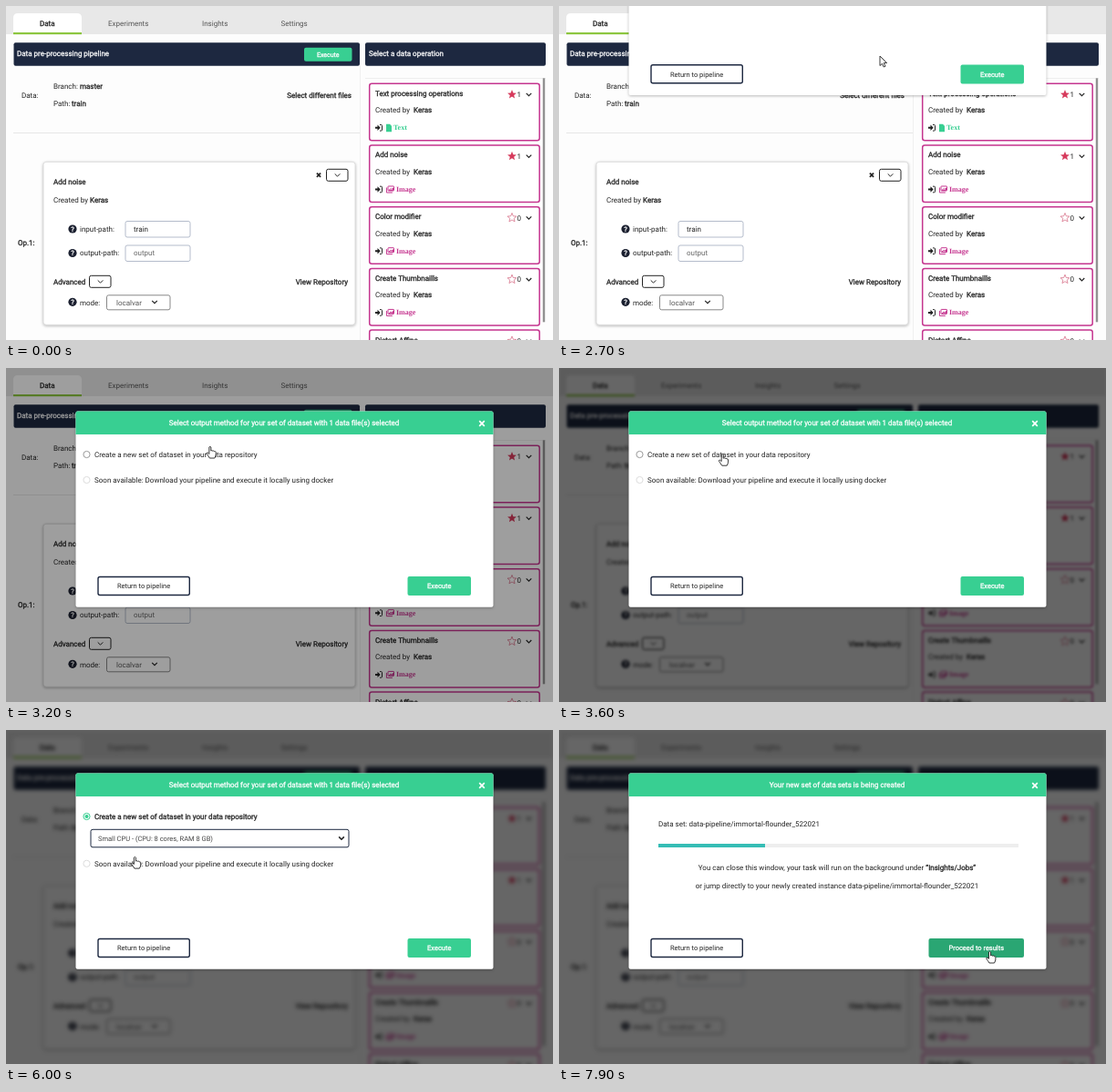
An HTML page that plays this animation: 600x367 px, repeating every 8 s.

```html
<!DOCTYPE html>
<html lang="en">
<head>
<meta charset="utf-8">
<title>Data pipeline</title>
<style>
html, body { margin: 0; width: 100%; height: 100%; overflow: hidden; background: #fdfdfd; }
svg { display: block; width: 100vw; height: 100vh; font: 8px Roboto, Arial, sans-serif; text-rendering: geometricPrecision; }
.serif { font-family: "Liberation Serif", Times, serif; font-weight: bold; }
.shadow { filter: drop-shadow(0 1px 1.5px #0004); }
</style>
</head>
<body>
<svg viewBox="0 0 600 367">
  <g id="page"></g>
  <rect id="shade" width="600" height="367"/>
  <g id="modal" class="shadow"></g>
  <g id="cursor" stroke-linejoin="round"></g>
</svg>
<script>
const LOOP = 8000;
const NAVY = '#1d2840', GREEN = '#38cf92', DARK_GREEN = '#2aa673', PINK = '#c5358f', INK = '#222';
const $ = id => document.getElementById(id);

// Drawing helpers, each returning SVG markup
const rect = (x, y, w, h, fill, stroke = 'none', r = 0, line = 1) =>
  `<rect x="${x}" y="${y}" width="${w}" height="${h}" rx="${r}" fill="${fill}" stroke="${stroke}" stroke-width="${line}"/>`;
const path = (d, fill, stroke = 'none', line = 1) =>
  `<path d="${d}" fill="${fill}" stroke="${stroke}" stroke-width="${line}"/>`;
const circle = (x, y, r, fill, stroke = 'none', line = 1) =>
  `<circle cx="${x}" cy="${y}" r="${r}" fill="${fill}" stroke="${stroke}" stroke-width="${line}"/>`;
const raise = markup => `<g transform="translate(0 -.7)">${markup}</g>`;
const text = (x, y, s, { fill = INK, size = 8, bold = false, anchor = 'start', cls = '' } = {}) =>
  `<text x="${x}" y="${y}" font-size="${size}" fill="${fill}" text-anchor="${anchor}" class="${cls}"` +
  `${bold ? ` stroke="${fill}" stroke-width=".3"` : ''}>${s}</text>`;
const bold = (x, y, s, opts) => text(x, y, s, { bold: true, ...opts });
const chevron = (x, y, color = INK, line = 1.2) =>
  path(`M${x - 2.8} ${y - 1.4}l2.8 2.8 2.8-2.8`, 'none', color, line);
const cross = (x, y, r, color) =>
  path(`M${x - r} ${y - r}l${2 * r} ${2 * r}m0 ${-2 * r}l${-2 * r} ${2 * r}`, 'none', color, 1.7);
const button = (x, y, w, h, label, hover, size = 7.5) =>
  rect(x, y, w, h, hover ? DARK_GREEN : GREEN, 'none', 2) +
  bold(x + w / 2, y + h / 2 + 2.8, label, { fill: '#fff', size, anchor: 'middle' });
const toggle = (x, y) => rect(x, y, 23.5, 13, '#fff', INK, 2) + chevron(x + 12, y + 6.5, INK, 1);
const help = (x, y) => circle(x, y, 4.6, '#1b2030') +
  bold(x, y + 2.7, '?', { fill: '#fff', size: 7.5, anchor: 'middle' });

function star(x, y, full) {
  let d = '';
  for (let i = 0; i < 10; i++) {
    const r = i % 2 ? 2.3 : 5.2, a = i * Math.PI / 5;
    d += `${i ? 'L' : 'M'}${x + r * Math.sin(a)} ${y - r * Math.cos(a)}`;
  }
  return path(d + 'Z', full ? '#d63a5c' : '#fff', full ? 'none' : '#d9748c', .8);
}

function operation(title, i) {
  const y = 86 + i * 67.7, isText = i === 0, full = i < 2, color = isText ? GREEN : PINK;
  const icon = isText
    ? path(`M417 ${y + 44.5}h4l2 2v6.5h-6z`, color)
    : rect(419, y + 45, 6.5, 5, 'none', color, .5) + path(`M417.4 ${y + 46.5}v5.5h6.5M420 ${y + 49.5}l2-2 1 1 1.5-1.5v2.5z`, 'none', color);
  const enter = path(`M405 ${y + 47.5}h2.5v-2.2l3.2 3.2-3.2 3.2v-2.2h-2.5z`, INK) +
    path(`M410 ${y + 45.2}h1.5q1 0 1 1v4.6q0 1-1 1h-1.5`, 'none', INK);
  return rect(398.7, y, 186.5, 62.5, '#fff', PINK, 2.5, 1.5) +
    bold(405, y + 13.5, title) + star(555, y + 12, full) +
    text(560.5, y + 15, full ? 1 : 0) + chevron(573.5, y + 12) +
    text(405, y + 32, 'Created by') + bold(447, y + 32, 'Keras') + enter + icon +
    text(isText ? 425 : 428, y + 51, isText ? 'Text' : 'Image', { fill: color, cls: 'serif' });
}

function field(y, label, value, color) {
  return help(73, y) + text(81, y + 3, label) +
    rect(131, y - 8.5, 71, 17.5, '#fff', '#b4bccb', 2) + text(140, y + 3, value, { fill: color });
}

function drawPage(hover) {
  const titles = ['Text processing operations', 'Add noise', 'Color modifier', 'Create Thumbnaills', 'Distort Affine'];
  const tabs = rect(0, 0, 600, 367, '#fdfdfd') + rect(0, 0, 600, 31, '#e8e8e8') +
    path('M8 31V13q0-5 5-5h65q5 0 5 5v18z', '#fff') + rect(8, 29, 75, 2.2, '#8cc63f') +
    bold(37, 22, 'Data') +
    ['Experiments', 'Insights', 'Settings'].map((s, i) =>
      text([112, 215, 301.5][i], 22, s, { fill: '#555' })).join('');
  return tabs + raise(
    rect(8.5, 41, 379.5, 25.5, NAVY, 'none', 2) + rect(394, 41, 198, 25.5, NAVY, 'none', 2) +
    bold(12, 56, 'Data pre-processing pipeline', { fill: '#fff' }) +
    bold(398, 56, 'Select a data operation', { fill: '#fff' }) +
    button(327, 46.5, 52.5, 15, 'Execute', hover, 7) +
    text(17, 102, 'Data:') + text(52, 91.5, 'Branch:') + bold(81, 91.5, 'master') +
    text(52, 111, 'Path:') + bold(72, 111, 'train') +
    bold(379, 102, 'Select different files', { anchor: 'end' }) +
    rect(8, 139.7, 380, 1, '#e6e6e6') + rect(394, 79.7, 198, 1, '#eee') + rect(388, 66, 1, 302, '#f0f0f0') +
    bold(13, 264, 'Op.1:') +
    `<g class="shadow">${rect(41, 172, 342, 179, '#fff', '#ddd', 3)}</g>` +
    bold(52, 196.5, 'Add noise') + cross(343, 186.5, 2.1, INK) + toggle(351.5, 180) +
    text(52, 216.5, 'Created by') + bold(92, 216.5, 'Keras') +
    field(245.7, 'input-path:', 'train', INK) + field(272.2, 'output-path:', 'output', '#666') +
    bold(52, 306.5, 'Advanced') + toggle(91.5, 297) +
    bold(375, 306.5, 'View Repository', { anchor: 'end' }) +
    help(73, 326) + text(81, 329.5, 'mode:') + rect(110.5, 318.5, 69.5, 16, '#fff', '#888', 2) +
    text(121, 329.5, 'localvar', { fill: '#555' }) + chevron(163, 326) +
    titles.map(operation).join('') + rect(588.8, 80, 2.4, 268, '#929292'));
}

function radio(y, label, on, color) {
  return circle(88.5, y, 3.6, '#fff', on ? GREEN : color) + (on ? circle(88.5, y, 2, GREEN) : '') +
    text(97, y + 3, label, { bold: on });
}

function machineSelect(t) {
  const choice = 'Small CPU - (CPU: 8 cores, RAM 8 GB)', size = 7.5;
  if (t >= 5500)
    return rect(93, 110, 283, 19.5, '#fff', NAVY, 2) + text(101, 122.5, choice, { fill: '#444', size }) + chevron(368, 119.5, INK, 1.6);
  return rect(92.5, 109.5, 284, 20.5, '#2b3b5c', 'none', 2) +
    bold(101, 122.5, 'Select a machine...', { fill: '#fff', size }) + chevron(368, 119.5, '#fff', 1.8);
}

function machineList(t) {
  if (t < 4700 || t >= 5500) return '';
  const options = ['Small CPU - (CPU: 8 cores, RAM 8 GB)', 'Medium CPU - (CPU: 16 cores, RAM 16 GB)', 'Large CPU - (CPU: 32 cores, RAM 32 GB)'];
  return rect(93, 129.5, 283, 39, '#fff', '#888') + options.map((s, i) => {
    const lit = i === 0 && t > 5000;
    return (lit ? rect(93.5, 130, 282, 13, '#2b3b5c') : '') +
      text(101, 139 + i * 13, s, { size: 7.5, fill: lit ? '#fff' : '#444' });
  }).join('');
}

function drawForm(t) {
  const picked = t >= 3700;
  return radio(95.7, 'Create a new set of dataset in your data repository', picked, '#999') +
    radio(picked ? 147.5 : 123.7, 'Soon available: Download your pipeline and execute it locally using docker', false, '#ddd') +
    (picked ? machineSelect(t) + machineList(t) : '') +
    button(440.5, 229.8, 69.5, 21, 'Execute', t >= 6850);
}

function drawProgress(t) {
  const name = 'data-pipeline/immortal-flounder_522021', middle = { anchor: 'middle' };
  return text(109, 106.5, 'Data set: ' + name) + rect(109, 125.7, 395, 4, '#eee') +
    rect(109, 125.7, 117 * ramp(t, 7300, 7700), 4, '#35bdb5') +
    text(305, 154.5, 'You can close this window, your task will run on the background under ' +
      `<tspan stroke="${INK}" stroke-width=".3">“Insights/Jobs”</tspan>`, middle) +
    text(305, 174.5, 'or jump directly to your newly created instance ' + name, middle) +
    button(405.5, 229.8, 104.5, 21, 'Proceed to results', true);
}

function drawModal(t) {
  const done = t >= 7300;
  return rect(76.5, 47.5, 458, 215.3, '#fff', 'none', 2) + path('M76.5 73V49.5q0-2 2-2h454q2 0 2 2v23.5z', GREEN) +
    bold(305, 63, done ? 'Your new set of data sets is being created'
      : 'Select output method for your set of dataset with 1 data file(s) selected', { fill: '#fff', anchor: 'middle' }) +
    cross(522, 61, 2.8, '#fff') +
    raise(rect(101, 230.2, 100.3, 20, '#fff', NAVY, 2, 1.4) +
      text(151, 243, 'Return to pipeline', { size: 7.5, anchor: 'middle' }) +
      (done ? drawProgress(t) : drawForm(t)));
}

// Pointer stops: time, x, y
const stops = [
  [0, 230, 372], [1400, 352, 55], [2720, 352, 55], [3000, 286, 70], [3200, 224, 86], [3550, 180, 94],
  [3800, 176, 95], [4400, 156, 116], [4800, 152, 119], [5300, 141, 139], [6000, 141, 139],
  [6800, 440, 236], [7100, 470, 242], [7900, 472.5, 243], [8000, 472.5, 243]
];
const ARROW = path('M0 0V10.5L2.5 8.3 4.2 12 6 11.2 4.3 7.6H7.6Z', '#fff', INK, .9);
const HAND = path('M-1 1Q0-.6 1 1V5Q2 4 3 5.2 4 4.4 4.8 5.7 6 5.2 6.4 6.6V9Q6.2 11 5 13H-.5Q-2 10.5-3.7 8.2-4 6.8-2.6 7L-1 8.4Z', '#fff', INK, .9);

const ramp = (t, from, to) => Math.min(1, Math.max(0, (t - from) / (to - from)));

function pointer(t) {
  const i = Math.max(1, stops.findIndex(s => s[0] > t)), [a, b] = [stops[i - 1], stops[i]];
  const u = ramp(t, a[0], b[0]);
  return [a[1] + (b[1] - a[1]) * u, a[2] + (b[2] - a[2]) * u];
}

let pageHover = null;
function render(t) {
  const hover = t >= 1350 && t < 2700;
  if (hover !== pageHover) $('page').innerHTML = drawPage(pageHover = hover);
  const blur = 2 * ramp(t, 3300, 3700);
  $('page').style.filter = blur ? `blur(${blur}px)` : 'none';
  $('shade').setAttribute('opacity', .6 * ramp(t, 2725, 3475));
  const lift = -270 * (1 - ramp(t, 2620, 2990)) ** 2;
  $('modal').innerHTML = t < 2650 ? '' : drawModal(t);
  $('modal').setAttribute('transform', `translate(0 ${lift})`);
  const hand = hover || t >= 3100 && t < 6200 || t >= 6800;
  $('cursor').innerHTML = hand ? HAND : ARROW;
  $('cursor').setAttribute('transform', `translate(${pointer(t)})`);
}

const start = performance.now();
function tick() {
  render((performance.now() - start) % LOOP);
  requestAnimationFrame(tick);
}
tick();
</script>
</body>
</html>
```
